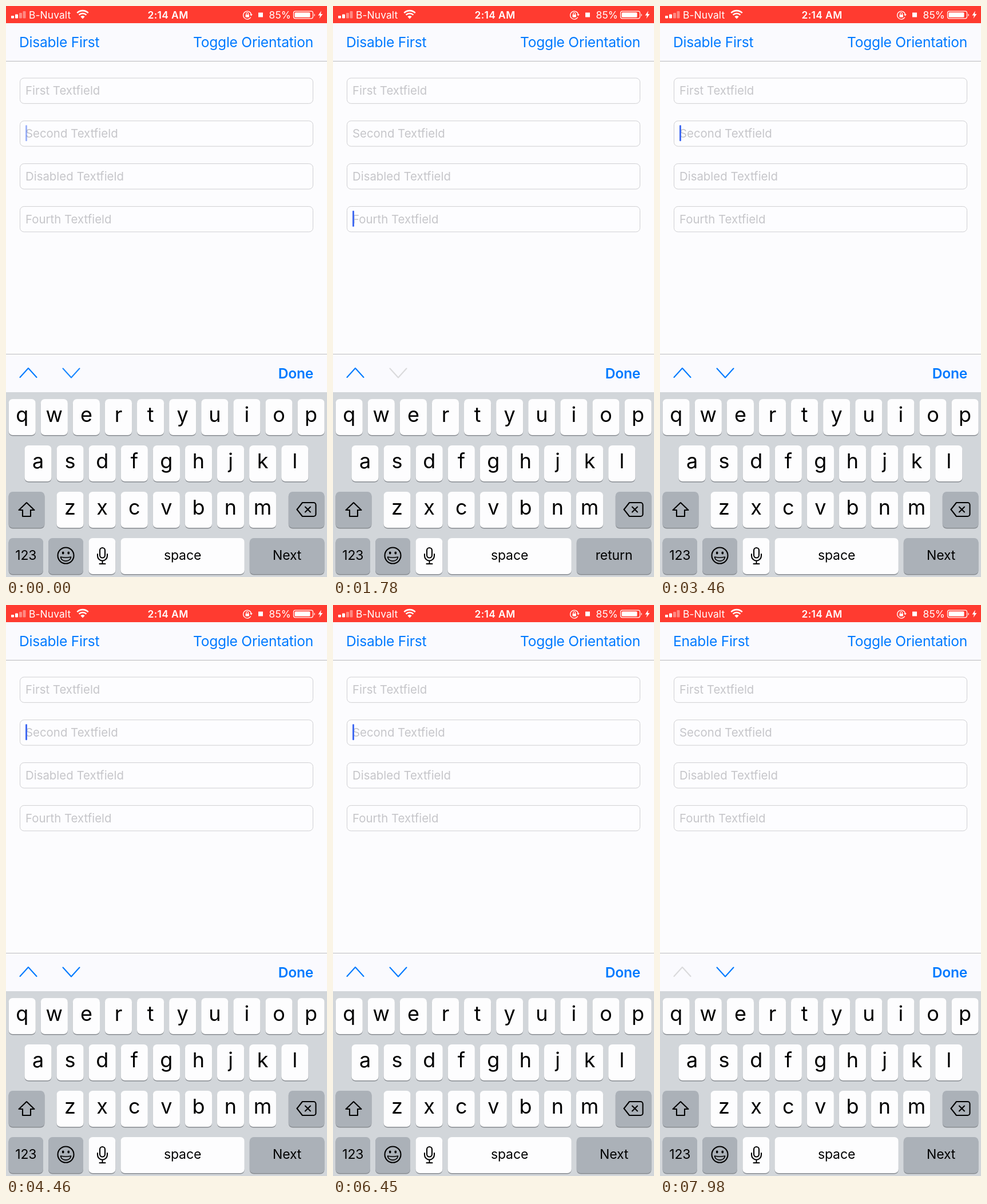
Recreate the animation shown at these times as an HTML page. Size 561 by 998 pixels, loop 8000 ms.

```html
<!DOCTYPE html>
<html lang="en">
<head>
<meta charset="utf-8">
<title>Text field navigation</title>
<style>
  html, body { margin: 0; width: 100%; height: 100%; overflow: hidden; background: #fcfcfe; }
  svg { display: block; width: 561px; height: 998px; font-family: Inter, Roboto, sans-serif; }
  .status { font-size: 17.4px; fill: #fff; letter-spacing: .1px; }
  .bar { font-size: 24.6px; fill: #007aff; letter-spacing: -.25px; }
  .hint { font-size: 20.4px; fill: #c6c6ca; }
  .letter { font-size: 36px; font-weight: 400; }
  .word { font-size: 23px; letter-spacing: -.1px; }
  .line { fill: none; stroke: #000; stroke-width: 2.1; stroke-linejoin: round; stroke-linecap: round; }
  .end { text-anchor: end; }
  .mid { text-anchor: middle; }
</style>
</head>
<body>
<svg viewBox="0 0 561 998">
  <rect width="561" height="998" fill="#fcfcfe"/>
  <rect y="30" width="561" height="66" fill="#fafafe"/>
  <rect y="96" width="561" height="1" fill="#b8b8ba"/>
  <rect y="609" width="561" height="66" fill="#fafafe"/>
  <rect y="608" width="561" height="1" fill="#bdbdbf"/>
  <rect y="675" width="561" height="323" fill="#d2d6da"/>

  <!-- Status bar -->
  <rect width="561" height="30" fill="#ff3b30"/>
  <g fill="#fff">
    <rect x="9" y="17" width="5" height="4.5" rx="1"/>
    <rect x="16" y="14.5" width="5" height="7" rx="1"/>
    <rect x="23" y="12" width="5" height="9.5" rx="1" opacity=".4"/>
    <rect x="29.5" y="9" width="5" height="12.5" rx="1" opacity=".4"/>
    <path d="M134 22.5L130.300 18.500A5.200 5.200 0 0 1 137.700 18.500Z"/>
    <rect x="441" y="11.500" width="8" height="8"/>
    <rect x="418.500" y="15" width="6.400" height="4.800" rx=".8"/>
    <rect x="504.500" y="11.200" width="27" height="8.600" rx="1.500"/>
    <path d="M538.500 13.200a3 3 0 0 1 0 5Z"/>
    <path d="M551 8.500L545.500 16.500H549L547.500 22L553.500 14H550Z"/>
  </g>
  <g fill="none" stroke="#fff">
    <path d="M127.600 15.600a9 9 0 0 1 12.800 0M124.300 12.200a13.700 13.700 0 0 1 19.400 0" stroke-width="2.600"/>
    <path d="M427.800 19.500a7 7 0 1 1 .8-4.500" stroke-width="1.300"/>
    <path d="M426 14.500h5l-2.500 3Z" fill="#fff" stroke="none"/>
    <path d="M419.900 15v-1.700a1.800 1.800 0 0 1 3.600 0V15" stroke-width="1.200"/>
    <rect x="502.500" y="9.200" width="34" height="12.600" rx="3" stroke-width="1.200"/>
  </g>
  <text class="status" x="40" y="22">B-Nuvalt</text>
  <text class="status mid" x="283" y="22" style="font-weight:600;letter-spacing:.4px">2:14 AM</text>
  <text class="status end" x="498" y="22">85%</text>

  <!-- Navigation bar and toolbar -->
  <text class="bar" id="toggle" x="23" y="72">Disable First</text>
  <text class="bar end" x="537" y="72">Toggle Orientation</text>
  <text class="bar end" x="537" y="651" font-weight="600">Done</text>
  <path class="line" id="up" d="M24.500 649L39 633L53.500 649" stroke-linecap="butt"/>
  <path class="line" id="down" d="M99.500 633.500L114 649.500L128.500 633.500" stroke-linecap="butt"/>

  <g id="fields"></g>
  <rect id="caret" x="34" width="3" height="28" rx="1.200" fill="#426bf2"/>
  <g id="keys"></g>

  <!-- Key symbols -->
  <g class="line">
    <path d="M36 868L49.500 881H43V892H29V881H22.500Z"/>
    <path d="M518 868H537.500a4 4 0 0 1 4 4V888a4 4 0 0 1-4 4H518L508.500 880ZM523 875.500l9 9m0-9l-9 9"/>
    <circle cx="104.500" cy="960.500" r="14"/>
    <path d="M95.500 963Q104.500 965 113.500 963C112 972.500 97 972.500 95.500 963Z" stroke-width="1.700"/>
    <rect x="164" y="947" width="9" height="17.500" rx="4.500"/>
    <path d="M160 958v3a8.500 8.500 0 0 0 17 0v-3M168.500 970v5M163.500 975h10"/>
  </g>
  <ellipse cx="99.700" cy="956" rx="1.900" ry="2.400"/>
  <ellipse cx="109.300" cy="956" rx="1.900" ry="2.400"/>
</svg>
<script>
const byId = id => document.getElementById(id);
const clamp = x => Math.min(1, Math.max(0, x));

function add(parent, tag, attrs, text = '') {
  const node = document.createElementNS(parent.namespaceURI, tag);
  for (const name in attrs) node.setAttribute(name, attrs[name]);
  node.textContent = text;
  return parent.appendChild(node);
}

// Text fields
const FIELD_STEP = 74.8;
['First', 'Second', 'Disabled', 'Fourth'].forEach((name, i) => {
  const y = 126 + i * FIELD_STEP;
  add(byId('fields'), 'rect', { x: 24.5, y, width: 512, height: 44.4, rx: 7, fill: '#fdfdff', stroke: '#cfcfd2' });
  add(byId('fields'), 'text', { class: 'hint', x: 34, y: y + 29.3 }, name + ' Textfield');
});

// Keyboard
const rowTop = row => 687 + row * 81;

function key(x, row, width, label = '', style = 'word', fill = '#fdfdfe') {
  const box = { x, y: rowTop(row), width, height: 63, rx: 7 };
  add(byId('keys'), 'rect', { ...box, y: box.y + 1.5, fill: '#888c91' });
  add(byId('keys'), 'rect', { ...box, fill });
  const baseline = box.y + (style === 'letter' ? 40 : 38.4);
  return add(byId('keys'), 'text', { class: style + ' mid', x: x + width / 2, y: baseline }, label);
}

[['qwertyuiop', 4.6], ['asdfghjkl', 32.4], ['zxcvbnm', 88.4]].forEach(([letters, left], row) =>
  [...letters].forEach((letter, i) => key(left + i * 56.1, row, 47.2, letter, 'letter')));

const DARK = '#abb1b8';
key(4.6, 2, 62.8, '', 'word', DARK);
key(493.8, 2, 62.6, '', 'word', DARK);
key(4.6, 3, 60.4, '123', 'word', DARK);
key(74, 3, 61, '', 'word', DARK);
key(144.4, 3, 47);
key(200.4, 3, 216.4, 'space');
const returnKey = key(425.8, 3, 130.6, 'Next', 'word', DARK);

// Timeline: each tap on an arrow moves the focus to another field
const LOOP = 8000, FADE = 400, PRESS = 300, DISABLE_AT = 7150;
const taps = [
  { at: -680, field: 1, arrow: 'down' },
  { at: 280, field: 3, arrow: 'down' },
  { at: 2130, field: 1, arrow: 'up' },
  { at: 4850, field: 0, arrow: 'up' },
  { at: 6050, field: 1, arrow: 'down' }
];
const GRAY = [218, 218, 220], BLUE = [0, 122, 255];

const tapAt = t => taps.filter(tap => tap.at <= t).pop() || taps[0];

function isEnabled(arrow, t) {
  const { field } = tapAt(t);
  return arrow === 'down' ? field < 3 : field > (t >= DISABLE_AT ? 1 : 0);
}

function pressOpacity(arrow, t) {
  return Math.min(1, ...taps.filter(tap => tap.arrow === arrow).map(({ at }) =>
    t < at ? 1 - .75 * clamp((t - at + PRESS) / 150) : .25 + .75 * clamp((t - at) / FADE)));
}

function drawArrow(arrow, t) {
  const changed = t >= DISABLE_AT ? DISABLE_AT : tapAt(t).at;
  const from = isEnabled(arrow, changed - 1) ? BLUE : GRAY;
  const to = isEnabled(arrow, t) ? BLUE : GRAY;
  const p = clamp((t - changed) / FADE);
  byId(arrow).style.stroke = `rgb(${from.map((c, i) => Math.round(c + (to[i] - c) * p))})`;
  byId(arrow).style.opacity = pressOpacity(arrow, t);
}

function caretOpacity(age) {
  const phase = age % 1000;
  return phase < 900 ? 1 - clamp((phase - 580) / 200) : clamp((phase - 930) / 70);
}

function draw(now) {
  const t = now % LOOP;
  const { at, field } = tapAt(t);
  byId('caret').setAttribute('y', 133.4 + field * FIELD_STEP);
  byId('caret').style.opacity = caretOpacity(t - at);
  byId('toggle').textContent = t < DISABLE_AT ? 'Disable First' : 'Enable First';
  returnKey.textContent = field === 3 ? 'return' : 'Next';
  drawArrow('up', t);
  drawArrow('down', t);
}

const start = performance.now();
function tick() {
  draw(performance.now() - start);
  requestAnimationFrame(tick);
}
tick();
</script>
</body>
</html>
```
